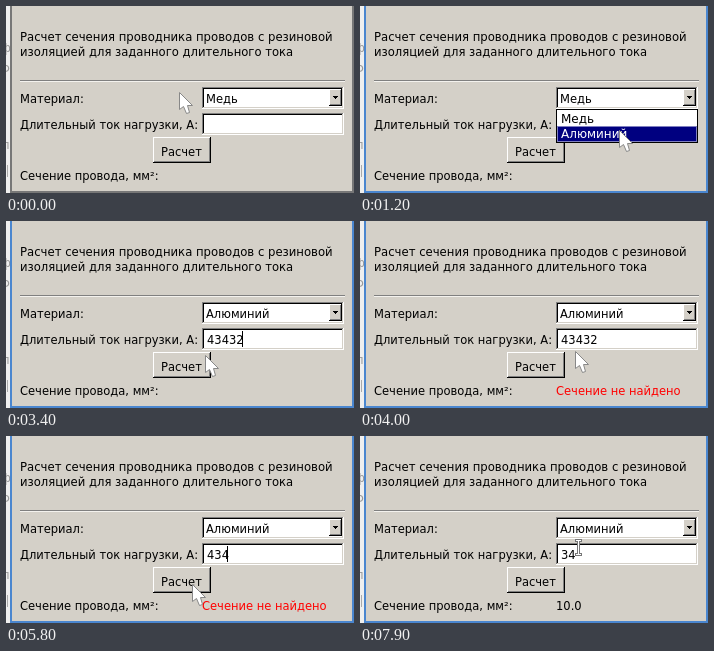
Animation, 348 px wide and 187 px high, one loop 8000 ms. Source, as an HTML page with a canvas:

```html
<!DOCTYPE html>
<html lang="ru">
<head>
<meta charset="utf-8">
<title>Расчет сечения</title>
<style>
  html, body { margin: 0; width: 348px; height: 187px; overflow: hidden; }
  canvas { display: block; }
</style>
</head>
<body>
<canvas id="stage" width="348" height="187"></canvas>
<script>
const ctx = document.getElementById('stage').getContext('2d');
const LOOP = 8000, STEP = 100;
const FACE = '#d4d0c8', NAVY = '#000080', GREY = '#808080';
const OPEN = 600, CHOOSE = 1300, FOCUS = 1700, HOME = 6400;
const BLINK_ON = 600, BLINK = 900;

// Each pointer move runs from one moment to another and ends at x, y
const start = { x: 174, y: 87 };
const moves = [
  { from: 0, to: 400, x: 268, y: 96 },
  { from: 600, to: 1100, x: 260, y: 125 },
  { from: 1400, to: 1500, x: 242, y: 118 },
  { from: 3100, to: 3400, x: 200, y: 135 },
  { from: 3800, to: 4500, x: 255, y: 121 },
  { from: 5100, to: 5500, x: 187, y: 149 },
  { from: 6000, to: 6400, x: 209, y: 117 },
  { from: 6600, to: 6800, x: 193, y: 135 },
  { from: 7200, to: 7900, x: 218, y: 111 }
];
const presses = [3500, 5600, 6900];
const entryClicks = [1500, 4400, HOME];

function pointerAt(t) {
  let { x, y } = start;
  for (const m of moves) {
    const k = Math.min(1, Math.max(0, (t - m.from) / (m.to - m.from)));
    x += (m.x - x) * k;
    y += (m.y - y) * k;
  }
  return [Math.round(x), Math.round(y)];
}

function typedAt(t) {
  if (t >= 6600) return '34';
  let n = 0;
  if (t >= 5100) n = Math.max(3, 4 - Math.floor((t - 5100) / 100));
  else if (t >= 3000) n = Math.min(5, 3 + Math.floor((t - 3000) / 150));
  else if (t >= 2400) n = 2;
  return '43432'.slice(0, n);
}

function rect(x, y, w, h, color) {
  ctx.fillStyle = color;
  ctx.fillRect(x, y, w, h);
}

function text(str, x, y, color = '#000', size = 11.5) {
  ctx.font = size + 'px "DejaVu Sans", sans-serif';
  ctx.fillStyle = color;
  ctx.fillText(str, x, y);
}

function bevel(x, y, w, h, light, dark) {
  rect(x, y, w, 1, light);
  rect(x, y, 1, h, light);
  rect(x, y + h - 1, w, 1, dark);
  rect(x + w - 1, y, 1, h, dark);
}

function field(y) {
  rect(196, y, 142, 22, '#fff');
  bevel(196, y, 142, 22, GREY, '#fff');
  bevel(197, y + 1, 140, 20, '#000', FACE);
}

function raised(x, y, w, h, down) {
  rect(x, y, w, h, FACE);
  bevel(x, y, w, h, down ? '#000' : '#fff', down ? '#fff' : '#000');
  bevel(x + 1, y + 1, w - 2, h - 2, down ? GREY : FACE, down ? FACE : GREY);
}

function windowFrame(focused) {
  rect(0, 0, 4, 187, '#efefef');
  text('ф', -5, 46, '#999');
  text('Ф', -6, 67, '#999');
  text('п', -4, 143, '#999');
  rect(1, 159, 1, 12, '#aaa');
  rect(4, 0, 344, 187, focused ? '#4a86cf' : '#777');
  rect(6, 0, 340, 185, FACE);
}

function labels() {
  text('Расчет сечения проводника проводов с резиновой', 14, 35, '#000', 11.67);
  text('изоляцией для заданного длительного тока', 14, 50, '#000', 11.6);
  rect(14, 74, 325, 1, GREY);
  rect(14, 75, 325, 1, '#f4f2ee');
  text('Материал:', 14, 97);
  text('Длительный ток нагрузки, А:', 14, 123);
  text('Сечение провода, мм²:', 14, 174);
}

function combo(t) {
  const selected = t >= CHOOSE && t < FOCUS;
  field(81);
  if (selected) rect(198, 83, 125, 18, NAVY);
  text(t < CHOOSE ? 'Медь' : 'Алюминий', 200, 97, selected ? '#fff' : '#000');
  raised(323, 83, 13, 17, false);
  for (let i = 0; i < 3; i++) rect(327 + i, 90 + i, 5 - 2 * i, 1, '#000');
}

function entry(t) {
  const str = typedAt(t);
  field(107);
  text(str, 201, 123);
  const click = entryClicks.filter(c => c <= t).pop();
  if (t < FOCUS || (t - click) % BLINK >= BLINK_ON) return;
  const shift = t >= HOME ? 0 : ctx.measureText(str).width;
  rect(Math.floor(200 + shift), 110, 1, 16, '#000');
}

function button(t) {
  const down = presses.some(p => t >= p && t < p + 100);
  const d = down ? 1 : 0;
  raised(147, 131, 58, 26, down);
  text('Расчет', 155 + d, 150 + d);
}

function result(t) {
  if (t >= 7100) text('10.0', 196, 174);
  else if (t >= 3600) text('Сечение не найдено', 196, 174, '#f00');
}

function popup(y) {
  const chosen = y > 120 ? 1 : 0;
  rect(196, 103, 142, 34, '#000');
  rect(197, 104, 140, 32, '#fff');
  const top = 104 + chosen * 16;
  rect(197, top, 140, 16, NAVY);
  ctx.strokeStyle = '#fff';
  ctx.lineWidth = 1;
  ctx.setLineDash([1, 1]);
  ctx.strokeRect(197.5, top + 0.5, 139, 15);
  ctx.setLineDash([]);
  ['Медь', 'Алюминий'].forEach((item, i) =>
    text(item, 201, 117 + i * 15, i === chosen ? '#fff' : '#000', 12));
}

function arrow(x, y) {
  const pts = [[0, 0], [0, 17], [4, 14], [7, 21], [10, 20], [8, 13], [13, 13]];
  ctx.beginPath();
  pts.forEach(([px, py]) => ctx.lineTo(x + px - 0.5, y + py - 0.5));
  ctx.closePath();
  ctx.fillStyle = '#fff';
  ctx.fill();
  ctx.lineWidth = 1;
  ctx.lineJoin = 'round';
  ctx.strokeStyle = '#888';
  ctx.stroke();
}

function beam(x, y) {
  for (const end of [y - 8, y + 6]) rect(x - 3, end, 7, 3, '#777');
  rect(x - 1, y - 8, 3, 17, '#777');
  for (const end of [y - 7, y + 7]) rect(x - 2, end, 5, 1, '#fff');
  rect(x, y - 7, 1, 15, '#fff');
}

function draw(t) {
  const [x, y] = pointerAt(t);
  const open = t >= OPEN && t < CHOOSE;
  windowFrame(t >= OPEN);
  labels();
  combo(t);
  entry(t);
  button(t);
  result(t);
  if (open) popup(y);
  const overEntry = !open && x >= 196 && x < 338 && y >= 107 && y < 129;
  (overEntry ? beam : arrow)(x, y);
}

const began = performance.now();
function tick() {
  const t = (performance.now() - began) % LOOP;
  draw(Math.floor(t / STEP) * STEP);
  requestAnimationFrame(tick);
}
tick();
</script>
</body>
</html>
```
